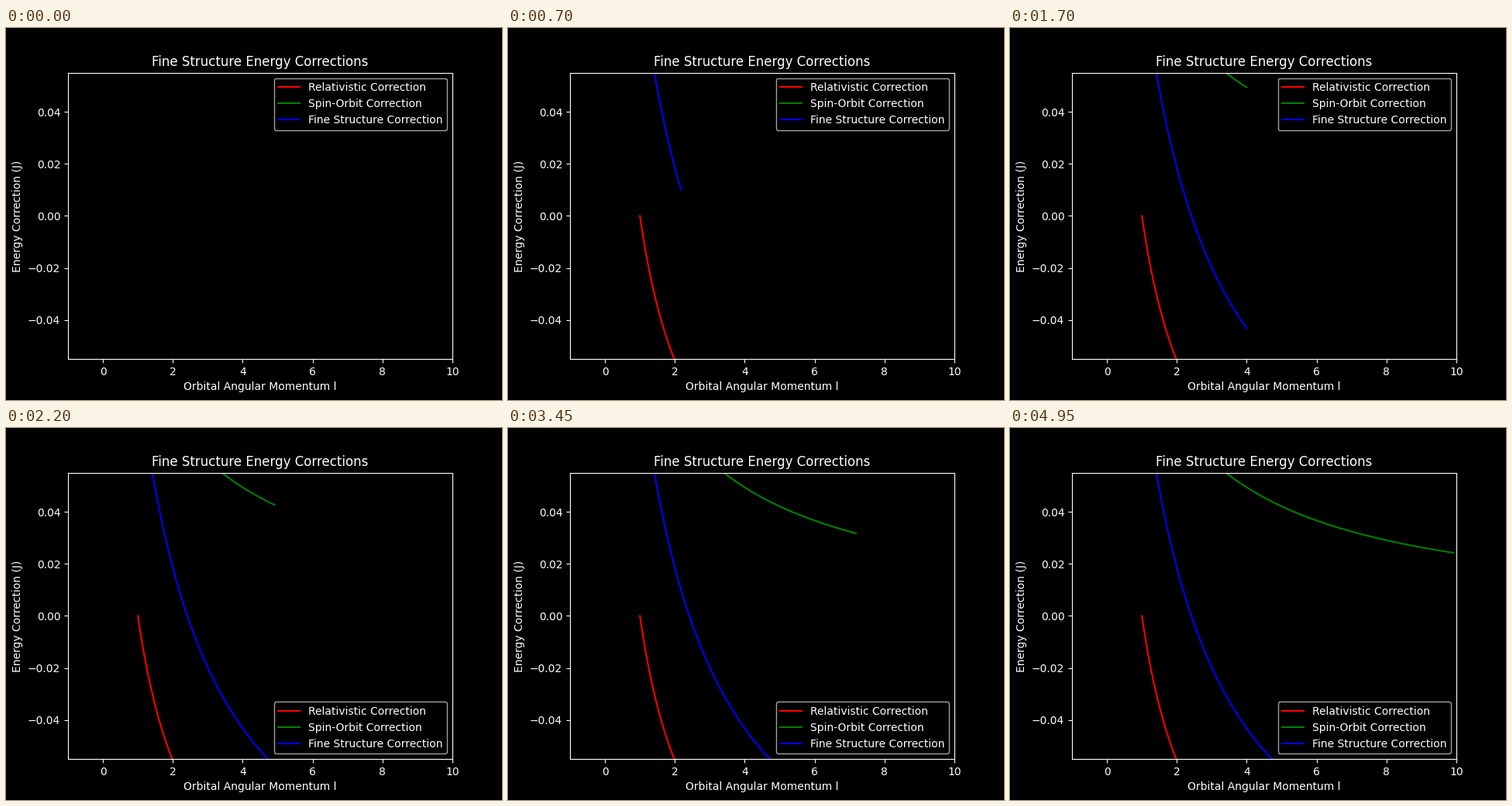
A matplotlib script that plays this animation: 640 px wide and 480 px high, repeating every 5 s.

```python
import numpy as np
import matplotlib.pyplot as plt
from matplotlib.animation import FuncAnimation

FRAMES = 100
INTERVAL = 50
SCALE = 0.2776

plt.style.use("dark_background")
fig, ax = plt.subplots(figsize=(6.4, 4.8), dpi=100)

l = np.linspace(1, 10, FRAMES)
relativistic = SCALE * (0.75 / (l + 0.5) - 0.5)
spin_orbit = SCALE * l / ((l + 0.5) * (l + 1))
fine_structure = relativistic + spin_orbit

curves = [
    ("Relativistic Correction", "red", relativistic),
    ("Spin-Orbit Correction", "green", spin_orbit),
    ("Fine Structure Correction", "blue", fine_structure),
]
lines = [ax.plot([], [], color=color, label=label)[0]
         for label, color, _ in curves]

ax.set_xlim(-1, 10)
ax.set_ylim(-0.055, 0.055)
ax.set_title("Fine Structure Energy Corrections")
ax.set_xlabel("Orbital Angular Momentum l")
ax.set_ylabel("Energy Correction (J)")
legend = ax.legend(loc="upper right")

# The legend makes way once the spin-orbit curve reaches its left edge.
LEGEND_LEFT = 4.9


def update(n):
    for line, (_, _, energy) in zip(lines, curves):
        line.set_data(l[:n], energy[:n])
    blocked = n > 0 and l[n - 1] > LEGEND_LEFT
    legend.set_loc("lower right" if blocked else "upper right")
    return [*lines, legend]


anim = FuncAnimation(fig, update, frames=FRAMES, interval=INTERVAL,
                     init_func=lambda: update(0), repeat=True,
                     repeat_delay=0, blit=False)
plt.show()
```
